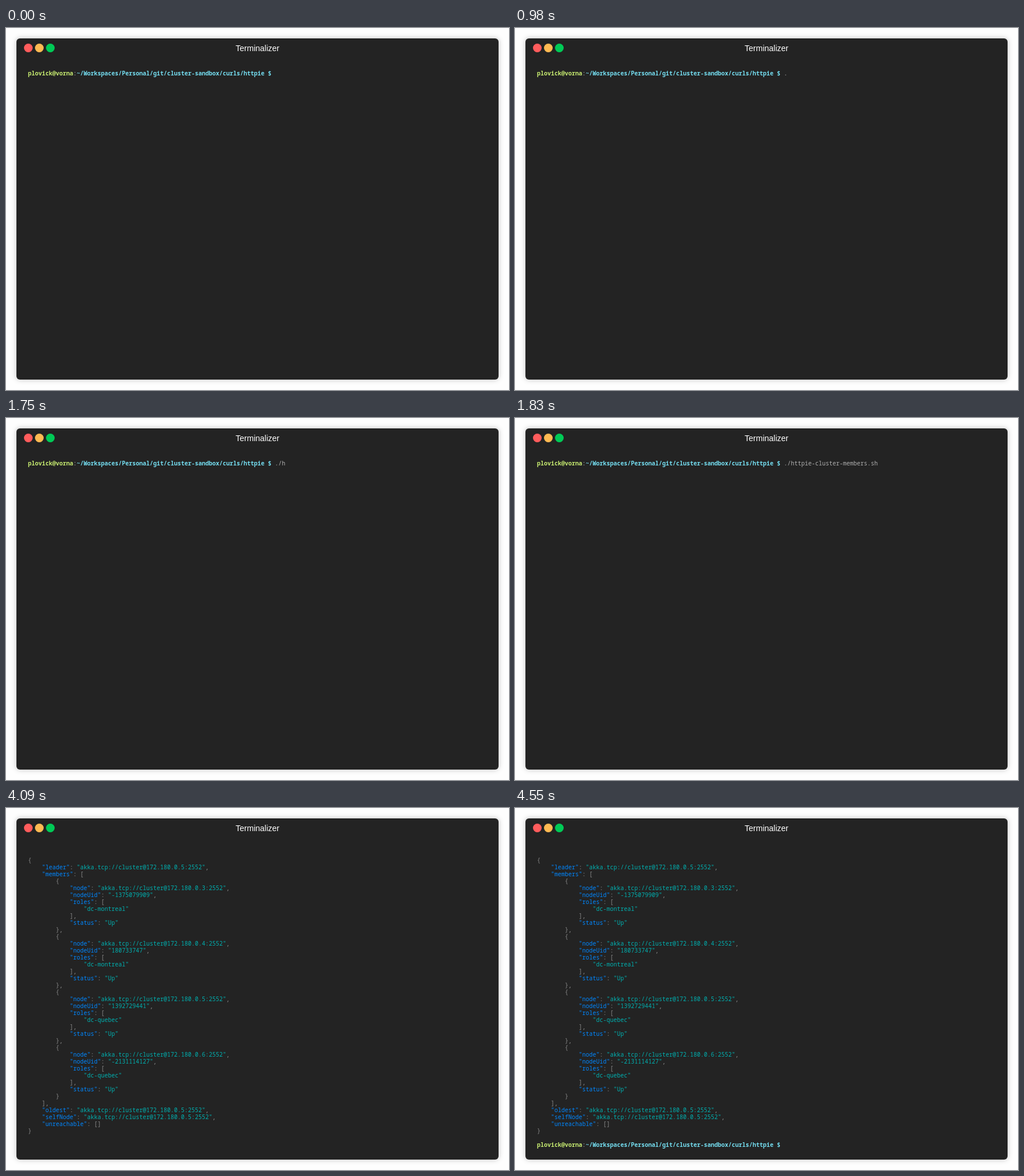
Recreate the animation shown at these times as an HTML page. Size 868 by 626 pixels, loop 4830 ms.

```html
<!DOCTYPE html>
<html lang="en">
<head>
<meta charset="utf-8">
<title>Terminalizer</title>
<style>
  html, body { margin: 0; width: 100%; height: 100%; overflow: hidden; background: #fefefe; }
  .window {
    position: absolute; left: 18px; top: 18px; width: 832px; height: 590px;
    border-radius: 6px; background: #232323; box-shadow: 0 0 10px rgba(0, 0, 0, .25);
  }
  .dot { position: absolute; top: 9px; width: 15px; height: 15px; border-radius: 50%; }
  .close { left: 13px; background: #ff5c5c; }
  .minimize { left: 32px; background: #ffba52; }
  .maximize { left: 51px; background: #00ca56; }
  .title {
    position: absolute; left: 0; top: 9px; width: 100%; text-align: center; color: #fff;
    font: 14px/16px "Liberation Sans", Arial, sans-serif;
  }
  .line, .output {
    position: absolute; left: 20px; margin: 0; white-space: pre; color: #afafaf;
    font: 10px/12px "Noto Sans Mono", "DejaVu Sans Mono", monospace;
    font-variant-ligatures: none;
  }
  .first { top: 54px; }
  .output { top: 66px; color: #8a8a8a; }
  .last { top: 558px; }
  .user { color: #c8ed71; }
  .path { color: #75dff2; }
  .key { color: #0087ff; }
  .text { color: #00afaf; }

  /* Every part switches on or off at one moment of the 4830 ms loop. */
  .first, .output, .last, .typed { animation: 4830ms step-end infinite; }
  .first { animation-name: clear; }
  .t1 { animation-name: type1; }
  .t2 { animation-name: type2; }
  .t3 { animation-name: type3; }
  .t4 { animation-name: type4; }
  .output { animation-name: print; }
  .last { animation-name: prompt; }
  @keyframes clear  { 0% { opacity: 1 } 84.679%, 100% { opacity: 0 } }
  @keyframes type1  { 0% { opacity: 0 } 20.289%, 100% { opacity: 1 } }
  @keyframes type2  { 0% { opacity: 0 } 24.016%, 100% { opacity: 1 } }
  @keyframes type3  { 0% { opacity: 0 } 36.231%, 100% { opacity: 1 } }
  @keyframes type4  { 0% { opacity: 0 } 37.888%, 100% { opacity: 1 } }
  @keyframes print  { 0% { opacity: 0 } 84.679%, 100% { opacity: 1 } }
  @keyframes prompt { 0% { opacity: 0 } 85.300%, 100% { opacity: 1 } }
</style>
</head>
<body>
<div class="window">
  <div class="dot close"></div>
  <div class="dot minimize"></div>
  <div class="dot maximize"></div>
  <div class="title">Terminalizer</div>
  <div class="line first"><b class="user">plovick@vorna</b>:<b class="path">~/Workspaces/Personal/git/cluster-sandbox/curls/httpie $</b> <span class="typed t1">.</span><span class="typed t2">/</span><span class="typed t3">h</span><span class="typed t4">ttpie-cluster-members.sh</span></div>
  <pre class="output"></pre>
  <div class="line last"><b class="user">plovick@vorna</b>:<b class="path">~/Workspaces/Personal/git/cluster-sandbox/curls/httpie $</b></div>
</div>
<script>
  const address = host => `akka.tcp://cluster@172.180.0.${host}:2552`;
  const member = (host, nodeUid, role) =>
    ({ node: address(host), nodeUid, roles: [role], status: "Up" });

  const reply = {
    leader: address(5),
    members: [
      member(3, "-1375079909", "dc-montreal"),
      member(4, "180733747", "dc-montreal"),
      member(5, "1392729441", "dc-quebec"),
      member(6, "-2131114127", "dc-quebec")
    ],
    oldest: address(5),
    selfNode: address(5),
    unreachable: []
  };

  // Quoted words followed by a colon are keys, the others are values.
  document.querySelector(".output").innerHTML = JSON.stringify(reply, null, 4)
    .replace(/"[^"]*"(:?)/g, (match, colon) => {
      const word = colon ? match.slice(0, -1) : match;
      return `<span class="${colon ? "key" : "text"}">${word}</span>${colon}`;
    });
</script>
</body>
</html>
```
